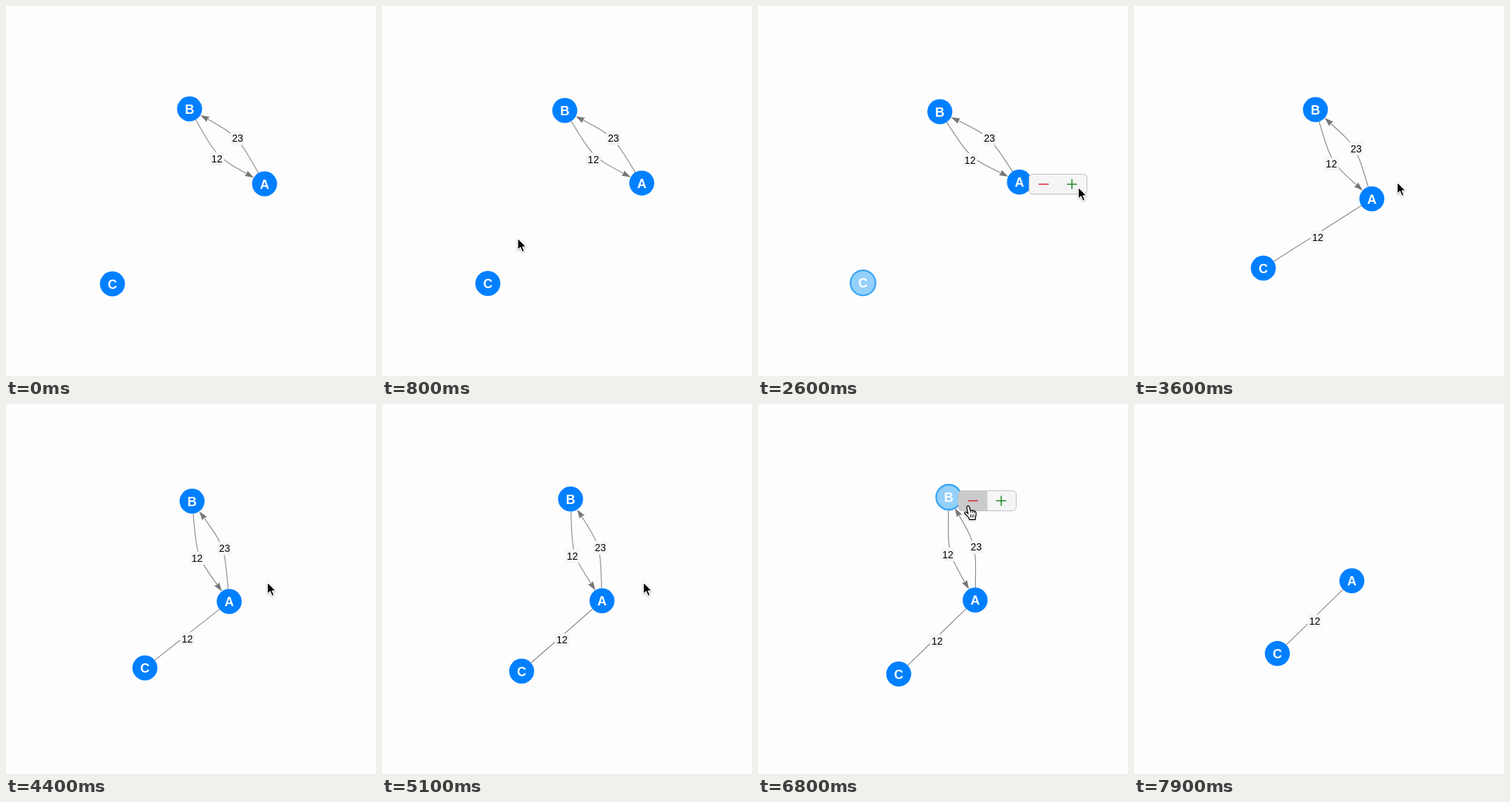
An HTML page for the animation above (8 s loop, 518 px wide and 518 px high).

```html
<!DOCTYPE html>
<html lang="en">
<head>
<meta charset="utf-8">
<title>Graph editor</title>
<style>
  html, body { margin: 0; width: 100%; height: 100%; overflow: hidden; background: #fdfdfd; }
  svg { display: block; width: 100vw; height: 100vh; }
  text { font-family: "Liberation Sans", Arial, sans-serif; text-anchor: middle; }
  .edge { fill: none; stroke: #858585; stroke-width: 1.1; }
  .arrow { fill: #757575; }
  .tag rect { fill: #f6f6f6; }
  .tag text { font-size: 14px; fill: #000; }
  .node circle { fill: #0080ff; }
  .node text { font-size: 18px; font-weight: bold; fill: #fff; }
  .node.picked circle { fill: #93d0fb; stroke: #3ba6f6; stroke-width: 2.4; }
  .menu .half { fill: #f5f5f5; }
  .menu .half.over { fill: #cbcbcb; }
  .menu .frame { fill: none; stroke: #bebebe; }
  .menu .minus { stroke: #d4202f; stroke-width: 1.5; }
  .menu .plus { stroke: #16861f; stroke-width: 1.5; }
  #cursor { filter: drop-shadow(0 1px 1px rgba(0, 0, 0, .3)); }
</style>
</head>
<body>
<svg viewBox="0 0 518 518" id="stage">
  <g id="edges"></g>
  <g id="tags"></g>
  <g id="nodes"></g>
  <g id="menu" class="menu">
    <path class="half" d="M41 0H5Q0 0 0 5V23Q0 28 5 28H41Z"/>
    <path class="half" d="M41 0H76Q81 0 81 5V23Q81 28 76 28H41Z"/>
    <rect class="frame" width="81" height="28" rx="5"/>
    <path class="minus" d="M13.5 14H27.5"/>
    <path class="plus" d="M53 14H67M60 7V21"/>
  </g>
  <g id="cursor">
    <path id="pointer" d="M0 0V16.6L3.8 13L6.4 19.2L9.3 18L6.7 12H11.8Z"
      fill="#000" stroke="#fff" stroke-width="1.2" stroke-linejoin="round"/>
    <g id="hand" fill="#fff" stroke="#000" stroke-width="1.2" stroke-linejoin="round" stroke-linecap="round">
      <path d="M-1.7 1.5Q-1.4-.6.4-.3Q1.6 0 2 1.6L3.3 6.2Q4.7 5 6.1 6.5Q7.5 5.6 8.7 7.2Q10.4 6.7 11 8.8Q11.8 12 10.4 14.6V18.6H1.9Q1.7 16.4-.4 14.4L-4.3 10.5Q-5.3 9.1-4 8.3Q-2.7 7.8-1.2 9.5L.2 10.8Z"/>
      <path d="M3.3 6.2L4 9M6.1 6.5L6.5 9.2M8.7 7.2L8.9 9.5M3.5 12V15.5M5.8 12V15.5M8 12V15.5" stroke-width=".9"/>
    </g>
  </g>
</svg>
<script>
const LOOP = 8000, STEP = 100, RADIUS = 17.5, BEND = 20.5;
const LINK_AT = 2900, REMOVE_AT = 7100;

// Rows of [time, x, y]
const tracks = {
  A: [[0, 362, 249], [1600, 365, 247], [2800, 366, 246.5], [3600, 333, 270],
      [4400, 312.5, 276.5], [5100, 308, 275.5], [6800, 304, 274.5], [7100, 304, 274.5], [7900, 305, 247.5]],
  B: [[0, 257, 144], [1600, 255, 147.7], [2800, 254.5, 148], [3600, 254, 145],
      [4400, 260.5, 136], [5100, 264, 133], [6800, 267, 130.5], [7900, 267, 130.5]],
  C: [[0, 149, 389], [1600, 147.5, 388], [2800, 147, 387.5], [3600, 181, 367],
      [4400, 194.5, 369.5], [5100, 195.5, 374], [6800, 197, 378], [7100, 197, 378], [7900, 200.7, 349.3]],
  cursor: [[300, 458, 390], [800, 190, 325], [1000, 160, 378], [1300, 182, 391], [1600, 225, 394.5],
      [1900, 225, 394.5], [2400, 372, 252], [2700, 466, 254], [3000, 368, 248], [3600, 368.5, 246.5],
      [4400, 366, 249.5], [5700, 366, 249.5], [6250, 274, 137], [6600, 292, 142], [6800, 294, 143],
      [7200, 295, 143], [7700, 502, 190]]
};

// Rows of [from, to, x, y, hovered half]; -1 means neither half
const menus = [
  [1000, 1300, 159.5, 376.5, -1], [1300, 1500, 159.5, 376.5, 0], [1500, 1900, 159.5, 376.5, 1],
  [2400, 2900, 379.5, 235.5, -1],
  [6300, 6600, 280.5, 121.5, -1], [6600, REMOVE_AT, 280.5, 121.5, 0]
];
const picks = { A: [0, 0], B: [6500, REMOVE_AT], C: [1800, LINK_AT] };

const $ = id => document.getElementById(id);
const within = (t, [from, to]) => t >= from && t < to;
const show = (el, on) => el.setAttribute("display", on ? "inline" : "none");
const place = (el, x, y) => el.setAttribute("transform", `translate(${x} ${y})`);

function make(name, parent, attrs = {}) {
  const el = document.createElementNS("http://www.w3.org/2000/svg", name);
  for (const key in attrs) el.setAttribute(key, attrs[key]);
  return parent.appendChild(el);
}

// Monotone cubic interpolation along one column
function sample(rows, t, col) {
  const last = rows.length - 1;
  if (t <= rows[0][0]) return rows[0][col];
  if (t >= rows[last][0]) return rows[last][col];
  const i = rows.findIndex(row => row[0] > t) - 1;
  const slope = k => (rows[k + 1][col] - rows[k][col]) / (rows[k + 1][0] - rows[k][0]);
  const tangent = k => {
    if (k === 0) return slope(0);
    if (k === last) return slope(last - 1);
    const a = slope(k - 1), b = slope(k);
    return a * b > 0 ? 2 * a * b / (a + b) : 0;
  };
  const span = rows[i + 1][0] - rows[i][0], u = (t - rows[i][0]) / span;
  const p = rows[i][col], d = rows[i + 1][col] - p;
  const m = tangent(i) * span, n = tangent(i + 1) * span;
  return p + m * u + (3 * d - 2 * m - n) * u * u + (m + n - 2 * d) * u * u * u;
}

const at = (name, t) => ({ x: sample(tracks[name], t, 1), y: sample(tracks[name], t, 2) });

function toward(p, q, dist) {
  const len = Math.hypot(q.x - p.x, q.y - p.y);
  return { x: p.x + (q.x - p.x) / len * dist, y: p.y + (q.y - p.y) / len * dist };
}

function makeEdge(from, to, label, bend) {
  const line = make("path", $("edges"), { class: "edge" });
  const arrow = make("path", $("edges"), { class: "arrow" });
  const tag = make("g", $("tags"), { class: "tag" });
  make("rect", tag, { x: -10, y: -9.5, width: 20, height: 19, rx: 3 });
  make("text", tag, { y: 5 }).textContent = label;
  return { from, to, bend, line, arrow, tag };
}

function makeNode(name) {
  const g = make("g", $("nodes"), { class: "node" });
  make("circle", g, { r: RADIUS });
  make("text", g, { y: 6.8 }).textContent = name;
  return g;
}

const edges = [makeEdge("B", "A", "12", BEND), makeEdge("A", "B", "23", BEND), makeEdge("C", "A", "12", 0)];
const nodes = { A: makeNode("A"), B: makeNode("B"), C: makeNode("C") };
const halves = document.querySelectorAll(".half");

function drawEdge(edge, pos, visible) {
  [edge.line, edge.arrow, edge.tag].forEach(el => show(el, visible));
  if (!visible) return;
  const p = pos[edge.from], q = pos[edge.to];
  const dx = q.x - p.x, dy = q.y - p.y, len = Math.hypot(dx, dy);
  const knee = {
    x: (p.x + q.x) / 2 - dy / len * edge.bend,
    y: (p.y + q.y) / 2 + dx / len * edge.bend
  };
  const start = toward(p, knee, RADIUS);
  const tip = toward(q, knee, RADIUS);
  const end = edge.bend ? toward(q, knee, RADIUS + 10) : tip;
  edge.line.setAttribute("d",
    `M${start.x} ${start.y}C${knee.x} ${knee.y} ${knee.x} ${knee.y} ${end.x} ${end.y}`);
  if (edge.bend) {
    const angle = Math.atan2(q.y - knee.y, q.x - knee.x) * 180 / Math.PI;
    edge.arrow.setAttribute("d", "M0 0L-12.5-4.2L-11 0L-12.5 4.2Z");
    edge.arrow.setAttribute("transform", `translate(${tip.x} ${tip.y}) rotate(${angle})`);
  }
  place(edge.tag, knee.x + .2, knee.y + (edge.bend ? 3 : 5.7));
}

function draw(t) {
  const pos = { A: at("A", t), B: at("B", t), C: at("C", t) };
  const hasB = t < REMOVE_AT;

  edges.forEach(edge => drawEdge(edge, pos, edge.bend ? hasB : t >= LINK_AT));
  for (const name in nodes) {
    place(nodes[name], pos[name].x, pos[name].y);
    nodes[name].classList.toggle("picked", within(t, picks[name]));
  }
  show(nodes.B, hasB);

  const menu = menus.find(row => within(t, row));
  show($("menu"), menu);
  if (menu) {
    place($("menu"), menu[2], menu[3]);
    halves.forEach((half, i) => half.classList.toggle("over", i === menu[4]));
  }

  const cursor = at("cursor", t), isHand = within(t, [6600, 7200]);
  show($("cursor"), within(t, [300, 7800]));
  show($("hand"), isHand);
  show($("pointer"), !isHand);
  place($("cursor"), cursor.x, cursor.y);
}

const began = performance.now();
function tick() {
  const t = (performance.now() - began) % LOOP;
  draw(Math.floor(t / STEP) * STEP);
  requestAnimationFrame(tick);
}
tick();
</script>
</body>
</html>
```
